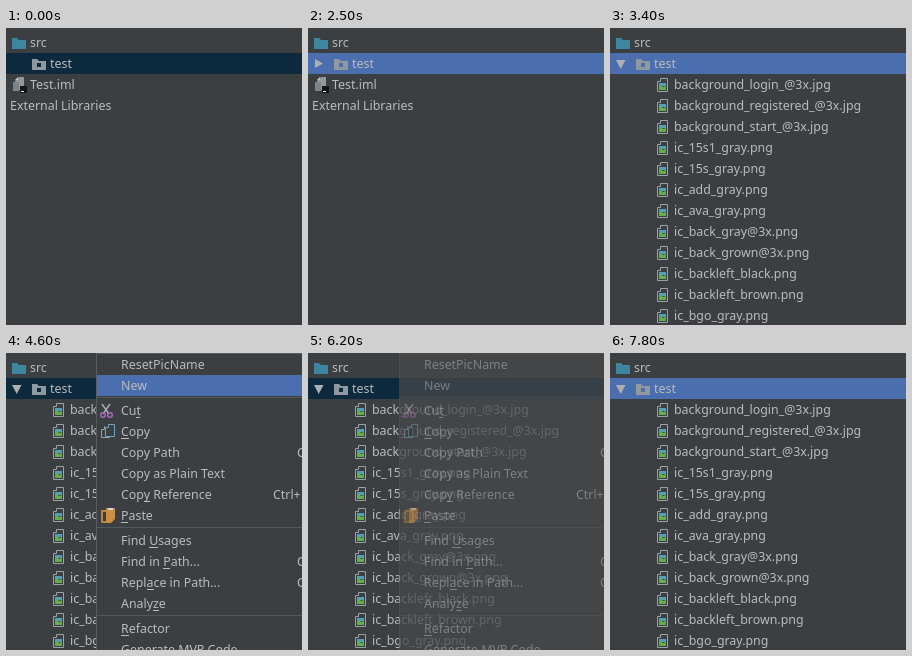
Animation, 296 px wide and 297 px high, one loop 8 s. Source, as an HTML page with a canvas:

```html
<!DOCTYPE html>
<html lang="en">
<head>
<meta charset="utf-8">
<style>
  html, body { margin: 0; width: 100%; height: 100%; overflow: hidden; background: #3c3f41; }
  canvas { display: block; }
</style>
</head>
<body>
<canvas id="stage" width="296" height="297"></canvas>
<script>
const ctx = document.getElementById('stage').getContext('2d');
const W = 296, H = 297, ROW = 21, LOOP = 8000;
const BG = '#3c3f41', TEXT = '#bbbbbb', BLUE = '#4b6eaf', NAVY = '#0d293e', GRAY = '#8f999f';
const FONT = '12.4px "Noto Sans", "Open Sans", sans-serif';

const topFiles = ['background_login_@3x.jpg', 'background_registered_@3x.jpg', 'background_start_@3x.jpg',
  'ic_15s1_gray.png', 'ic_15s_gray.png', 'ic_add_gray.png', 'ic_ava_gray.png', 'ic_back_gray@3x.png',
  'ic_back_grown@3x.png', 'ic_backleft_black.png', 'ic_backleft_brown.png', 'ic_bgo_gray.png'];
const laterFiles = ['ic_bgo_gray.png', 'ic_camera_gray.png', 'ic_card_gray.png', 'ic_check_brown.png',
  'ic_check_gray.png', 'ic_close_black.png', 'ic_close_gray.png', 'ic_code_gray.png', 'ic_date_gray.png',
  'ic_delete_gray.png', 'ic_down_gray.png', 'ic_edit_gray.png', 'ic_email_gray.png', 'ic_eye_gray.png',
  'ic_face_gray.png'];

// label, row centre, index of the underlined letter, shortcut, shortcut offset
const menuItems = [
  ['ResetPicName', 12], ['New', 33],
  ['Cut', 58, 2], ['Copy', 79, 0], ['Copy Path', 100, -1, 'Ctrl', 201], ['Copy as Plain Text', 121],
  ['Copy Reference', 142, 3, 'Ctrl+', 177], ['Paste', 163, 0],
  ['Find Usages', 188, 5], ['Find in Path...', 209, 8, 'Ctrl', 201], ['Replace in Path...', 230, 4, 'Ctrl', 201],
  ['Analyze', 251, 5],
  ['Refactor', 276, 0], ['Generate MVP Code', 297]];

function rect(color, x, y, w, h) {
  ctx.fillStyle = color;
  ctx.fillRect(x, y, w, h);
}

function poly(color, ...points) {
  ctx.fillStyle = color;
  ctx.beginPath();
  for (let i = 0; i < points.length; i += 2) ctx.lineTo(points[i], points[i + 1]);
  ctx.fill();
}

function line(color, width, ...points) {
  ctx.strokeStyle = color;
  ctx.lineWidth = width;
  ctx.beginPath();
  for (let i = 0; i < points.length; i += 2) ctx.lineTo(points[i], points[i + 1]);
  ctx.stroke();
}

function label(text, x, centre) {
  ctx.fillStyle = TEXT;
  ctx.fillText(text, x, centre + 4);
}

function folder(x, y, color, dot) {
  poly(color, x, y - 5, x + 5, y - 5, x + 7, y - 3, x + 14, y - 3, x + 14, y + 6, x, y + 6);
  if (dot) rect(dot, x + 5, y - 1, 4, 4);
}

function page(x, y, w, h) {
  poly(GRAY, x + 4, y, x + w, y, x + w, y + h, x, y + h, x, y + 4);
  poly('#c3c8cb', x, y + 3, x + 3, y, x + 3, y + 3);
}

function outlinedPage(color, x, y, w, h) {
  rect(BG, x, y, w, h);
  const l = x + 0.5, t = y + 0.5, r = x + w - 0.5, b = y + h - 0.5;
  line(color, 1, l + 3, t, r, t, r, b, l, b, l, t + 3, l + 3, t + 3, l + 3, t);
}

function moduleIcon(y) {
  page(9, y - 8, 9, 13);
  rect(BG, 6, y - 4, 1, 11);
  rect('#7d8387', 7, y - 3, 6, 9);
  rect('#151515', 14, y + 1, 7, 7);
  rect('#eeeeee', 15, y + 6, 3, 1);
}

function imageIcon(y) {
  outlinedPage('#9aa3a8', 47, y - 7, 11, 14);
  rect('#4f9fbd', 49, y - 2, 7, 3);
  poly('#62b04a', 49, y + 5, 49, y + 1, 51, y, 53, y + 2, 56, y + 1, 56, y + 5);
}

function arrowRight(x, y) {
  poly('#adafb1', x, y - 5, x + 8, y - 0.5, x, y + 4);
}

function fileRow(name, y) {
  imageIcon(y);
  label(name, 64, y);
}

function tree({ select, arrow, open }) {
  rect(select, 0, 25, W, ROW);
  folder(6, 15, '#3e86a0');
  label('src', 24, 15);
  folder(26, 36, GRAY, select);
  label('test', 44, 36);
  if (open) {
    poly('#adafb1', 6, 32, 15.5, 32, 10.75, 41);
    topFiles.forEach((name, i) => fileRow(name, 57 + i * ROW));
  } else {
    if (arrow) arrowRight(7, 36);
    moduleIcon(57);
    label('Test.iml', 24, 57);
    label('External Libraries', 4, 78);
  }
}

function scrolledTree(arrows) {
  laterFiles.forEach((name, i) => {
    const y = i * ROW - 6;
    fileRow(name, y);
    if (i && i <= arrows) arrowRight(27, y);
  });
}

function dialog(alpha) {
  ctx.save();
  ctx.globalAlpha = alpha;
  const frame = ctx.createLinearGradient(0, 159, 0, H);
  [[0, '#8d949b'], [0.2, '#747b82'], [0.3, '#a4a9ae'], [0.45, '#eceeef'], [0.47, '#59626b'], [1, '#505a64']]
    .forEach(([at, color]) => frame.addColorStop(at, color));
  ctx.beginPath();
  ctx.roundRect(272.5, 158.5, 60, 180, 6);
  ctx.fillStyle = frame;
  ctx.fill();
  ctx.strokeStyle = '#1c1d1e';
  ctx.lineWidth = 1;
  ctx.stroke();
  ctx.beginPath();
  ctx.roundRect(273.5, 159.5, 60, 180, 5);
  ctx.strokeStyle = '#e6e8ea';
  ctx.stroke();
  rect('#b4b9be', 277, 185, 19, 112);
  rect('#17191b', 278, 186, 18, 111);
  rect(BG, 279, 187, 17, 110);
  rect('#0a0a0a', 281, 166, 14, 14);
  ctx.font = 'bold ' + FONT;
  label('Copy', 292, 205);
  ctx.font = FONT;
  label('To', 292, 243);
  ctx.restore();
}

function menuIcons(x) {
  line('#a9adb0', 1.5, x + 6, 51, x + 13, 61);
  line('#a9adb0', 1.5, x + 14, 51, x + 7, 61);
  ctx.strokeStyle = '#a56bb5';
  ctx.lineWidth = 1.5;
  for (const cx of [x + 7, x + 14]) {
    ctx.beginPath();
    ctx.arc(cx, 62, 2.3, 0, 7);
    ctx.stroke();
  }
  outlinedPage('#8fa3b0', x + 5, 73, 9, 12);
  outlinedPage('#6fa3c0', x + 9, 71, 10, 13);
  rect('#b9843f', x + 5, 157, 10, 13);
  rect(BG, x + 7, 159, 6, 9);
  poly('#c98f45', x + 10, 155, x + 19, 155, x + 19, 166, x + 15, 170, x + 10, 170);
  rect('#d8d8d8', x + 12, 155, 5, 2);
}

function menu(x, hover, alpha = 1) {
  ctx.save();
  ctx.globalAlpha = alpha;
  rect('#5a5d5f', x, 0, W - x, H);
  rect(BG, x + 1, 1, W - x, H);
  if (hover >= 0) rect(BLUE, x + 1, 1 + hover * ROW, W - x, ROW);
  for (const y of [44, 174, 262]) rect('#55585a', x + 1, y, W - x, 1);
  menuIcons(x);
  for (const [text, y, mark = -1, shortcut, offset] of menuItems) {
    const left = x + 25;
    label(text, left, y);
    if (mark >= 0) {
      const start = ctx.measureText(text.slice(0, mark)).width;
      rect(TEXT, Math.round(left + start), y + 6, Math.round(ctx.measureText(text[mark]).width), 1);
    }
    if (shortcut) label(shortcut, x + offset, y);
  }
  ctx.restore();
}

function draw(t) {
  const within = (from, to) => t >= from && t < to;
  rect(BG, 0, 0, W, H);
  ctx.font = FONT;

  if (within(2800, 3400)) {
    scrolledTree(t < 3000 ? 14 : t < 3100 ? 7 : 0);
  } else {
    const unfocused = t < 500 || within(900, 1800) || within(4400, 7800);
    tree({ select: unfocused ? NAVY : BLUE, arrow: t >= 2500, open: t >= 3400 });
  }
  rect('#393a3d', 0, 295, W, 1);
  rect('#443b42', 0, 296, W, 1);

  if (within(900, 1900)) dialog(t < 1800 ? 1 : 0.4);
  if (within(4400, 5100)) menu(90, t < 4600 ? -1 : t < 4900 ? 1 : 0);
  if (within(6200, 7800)) menu(91, -1, t < 6300 ? 0.5 : 1);
}

function tick() {
  draw(performance.now() % LOOP);
  requestAnimationFrame(tick);
}
tick();
</script>
</body>
</html>
```
